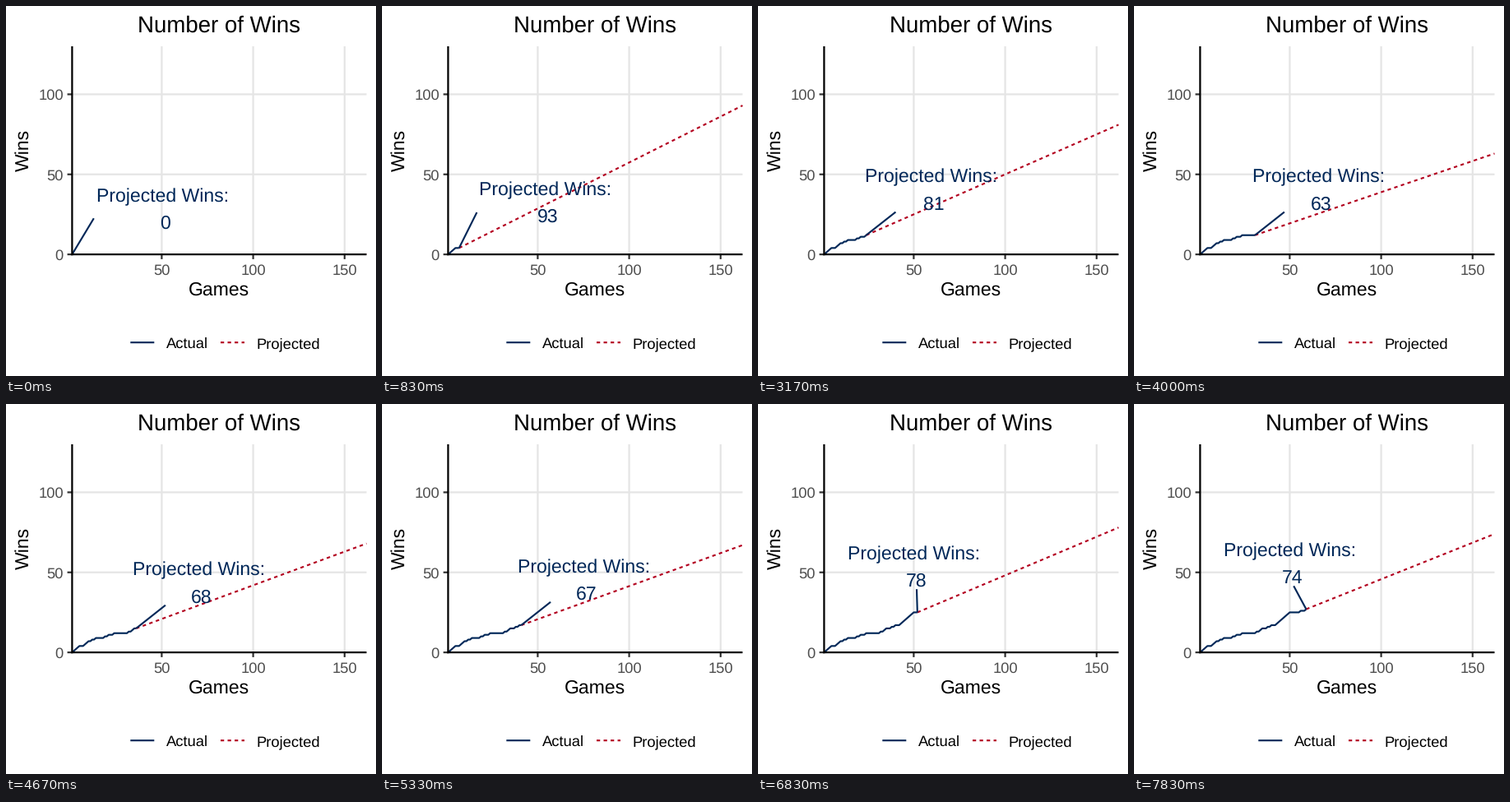
A matplotlib script that plays this animation: 450 by 450 pixels, repeating every 8000 ms.

```python
import math

import matplotlib.pyplot as plt
import numpy as np
from matplotlib.animation import FuncAnimation
from matplotlib.patches import Rectangle

plt.rcParams.update({
    "font.family": "Liberation Sans",
    "path.snap": False,
    "text.hinting": "none",
    "toolbar": "None",
})

SIZE, DPI = 450, 72          # at 72 dpi one point is one pixel
FRAMES, LOOP_MS, STEPS = 200, 8000, 48
GAMES, MAX_WINS = 162, 130
LEFT, RIGHT, TOP, BOTTOM = 80.4, 438.5, 49, 302.1
NAVY, RED = "#002758", "#B3001F"
GRID, TICK, TICK_TEXT = "#E5E5E5", "#333333", "#4D4D4D"
BASE = 23
SMALL, LARGE = 0.8 * BASE, 1.2 * BASE
LINE, RULE = 2.13, 2.23
DASHED = (0, (2, 2))

WON = {*range(2, 6), *range(8, 11), 12, 14, 19, 21, 24, 32, 34, 35, 38, 40,
       *range(43, 51), 56, 59}
WINS = np.cumsum([g in WON for g in range(1, GAMES + 1)])

# The callout box sits above the current point
BOX_W, BOX_H, BOX_GAP = 86.8, 27.0, 28.2
CAPTION_SHIFT = -3.2
SETTLE_GAME, SETTLE_X = 50, 193


def px(game):
    return LEFT + (game - 1) * (RIGHT - LEFT) / (GAMES - 1)


def py(wins):
    return BOTTOM - wins * (BOTTOM - TOP) / MAX_WINS


def current_game(step):
    return 1 + math.ceil((step - 0.5) * (GAMES - 1) / 130)


def callout_x(game):
    if game >= SETTLE_GAME:
        return SETTLE_X
    shift = np.interp(game, [1, 7, 16, 24, 36, 45],
                      [113.2, 108.4, 97.6, 81.8, 79.7, 79.7])
    return px(game) + shift


def connector_end(x, y, cx):
    """Point on the callout box where the connector lands."""
    w, h = RIGHT - LEFT, BOTTOM - TOP
    bottom, mid = y - BOX_GAP, y - BOX_GAP - BOX_H
    ex = min(max(x, cx - BOX_W), cx + BOX_W)

    def dist(u, v):
        return math.hypot((x - u) / w, (y - v) / h)

    near = dist(ex, bottom)
    if ex == x:
        return ex + (cx - ex) * near / dist(cx, bottom), bottom
    return ex, bottom + (mid - bottom) * near / dist(ex, mid)


fig = plt.figure(figsize=(SIZE / DPI, SIZE / DPI), dpi=DPI, facecolor="white")
ax = fig.add_axes([0, 0, 1, 1])
ax.set(xlim=(0, SIZE), ylim=(SIZE, 0))
ax.axis("off")
panel = Rectangle((LEFT, TOP), RIGHT - LEFT, BOTTOM - TOP,
                  transform=ax.transData)


def stroke(xs, ys, color, width=LINE, z=1, style="-", clip=False):
    line, = ax.plot(xs, ys, color=color, lw=width, ls=style, zorder=z,
                    solid_capstyle="butt", dash_capstyle="butt",
                    solid_joinstyle="round")
    if clip:
        line.set_clip_path(panel)
    return line


def label(x, y, s, size, color="black", ha="center", z=6, **kw):
    return ax.text(x, y, s, fontsize=size, color=color, ha=ha,
                   va="baseline", zorder=z, **kw)


# Grid, ticks and tick labels
for g in (50, 100, 150):
    x = px(g)
    stroke([x, x], [TOP, BOTTOM], GRID, RULE)
    stroke([x, x], [BOTTOM, BOTTOM + 5.8], TICK, RULE, 5)
    label(x, 326.4, str(g), SMALL, TICK_TEXT)
for n in (0, 50, 100):
    y = py(n)
    if n:
        stroke([LEFT, RIGHT], [y, y], GRID, RULE)
    stroke([LEFT - 5.8, LEFT], [y, y], TICK, RULE, 5)
    label(69.8, y + 6.6, str(n), SMALL, TICK_TEXT, ha="right")

# Axes and titles
stroke([LEFT, LEFT], [TOP, BOTTOM + RULE / 2], "black", RULE, 6)
stroke([LEFT - RULE / 2, RIGHT], [BOTTOM, BOTTOM], "black", RULE, 6)
label(259.2, 32.2, "Number of Wins", LARGE)
label(259.2, 351.8, "Games", BASE)
label(28, 175.6, "Wins", BASE, rotation=90, rotation_mode="anchor")

# Legend
for x, name, color, style in ((151.3, "Actual", NAVY, "-"),
                              (261, "Projected", RED, DASHED)):
    stroke([x, x + 29], [409.2, 409.2], color, style=style)
    label(x + 43.5, 416, name, SMALL, ha="left")

# Moving parts
actual = stroke([], [], NAVY, z=2, clip=True)
projected = stroke([], [], RED, z=3, style=DASHED, clip=True)
connector = stroke([], [], NAVY, z=4, clip=True)
caption = label(0, 0, "Projected Wins:", BASE, NAVY, z=4)
count = label(0, 0, "", BASE, NAVY, z=4)


def update(i):
    step = min((i + 1) * STEPS // FRAMES, STEPS - 1)
    game = current_game(step)
    wins = WINS[game - 1]
    total = round(float(wins) / game * GAMES)
    x, y, cx = px(game), py(wins), callout_x(game)

    played = np.arange(1, game + 1)
    actual.set_data(px(played), py(WINS[:game]))
    projected.set_data([x, RIGHT], [y, py(total)])
    ex, ey = connector_end(x, y, cx)
    connector.set_data([x, ex], [y, ey])
    caption.set_position((cx + CAPTION_SHIFT, y - 64.2))
    count.set_position((cx, y - 31.4))
    count.set_text(str(total))
    return actual, projected, connector, caption, count


anim = FuncAnimation(fig, update, frames=FRAMES, interval=LOOP_MS // FRAMES,
                     repeat=True, repeat_delay=0, blit=False)
plt.show()
```
